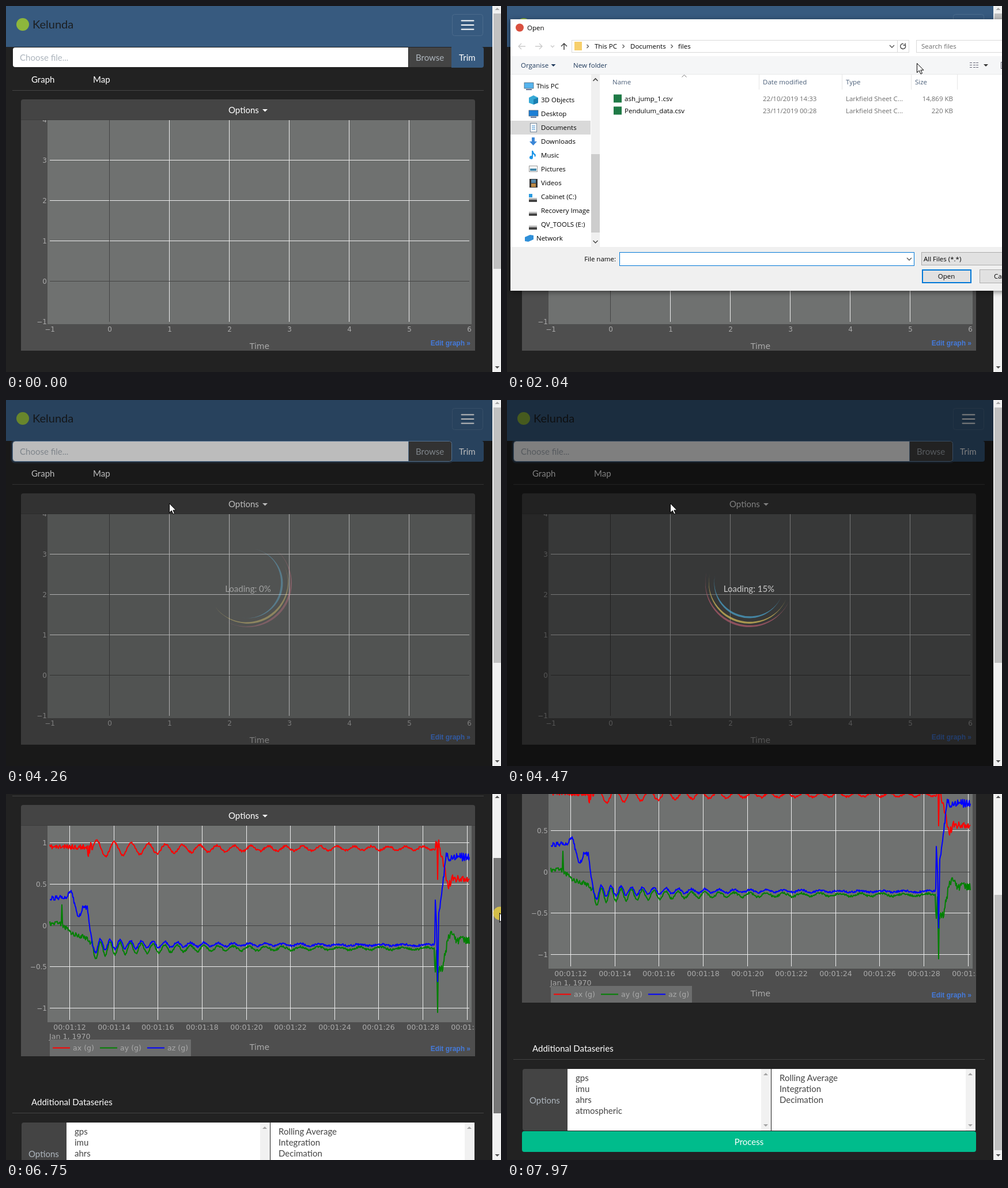
Write an HTML page that moves like this. It is 859x635 px and loops after 8000 ms.

```html
<!DOCTYPE html>
<html lang="en">
<head>
<meta charset="utf-8">
<title>Data viewer</title>
<style>
html, body { margin: 0; width: 100%; height: 100%; overflow: hidden; background: #222; }
svg { display: block; }
text { white-space: pre; }
.ui { font: 15px Lato, sans-serif; fill: #fff; }
.tick { font: 12px "DejaVu Sans", Verdana, sans-serif; fill: #aaa; }
.time { font-size: 12.6px; }
.axis { font-size: 14px; }
.win { font: 11.5px "Open Sans", "Noto Sans", sans-serif; fill: #000; }
.link { font: bold 12px "Liberation Sans", Arial, sans-serif; fill: #447adb; }
.mid { text-anchor: middle; }
.end { text-anchor: end; }
.blue { fill: #1e395b; }
.grey { fill: #6d6d6d; }
.pale { fill: #adb5bd; }
.dark { fill: #444; }
#dialog { filter: drop-shadow(0 2px 5px rgba(0,0,0,.5)); }
</style>
</head>
<body>
<svg id="stage" width="859" height="635" viewBox="0 0 859 635"></svg>
<script>
const LOOP = 8000, FIRST = 400, TICK = 203.3;  // the picture is refreshed once per tick
const OPEN = 2020, PICK = 3850, LOAD = 4050, READY = 5270, HOVER = 6080, PRESS = 6290, RELEASE = 7700;

const POINTER = [[400, 8, 232], [1010, 800, 115], [1420, 714, 96], [1620, 710, 98], [2230, 712, 100],
  [3040, 380, 200], [3450, 285, 170], [3650, 283, 179], [READY - 200, 283, 179], [5480, 838, 118], [HOVER, 856, 108]];
const SCROLL = [[PRESS, 0], [6700, 143], [7350, 228], [7900, 236]];

function along(keys, x) {
  if (x <= keys[0][0]) return keys[0].slice(1);
  const i = keys.findIndex(k => k[0] > x);
  if (i < 0) return keys.at(-1).slice(1);
  const a = keys[i - 1], b = keys[i], u = (x - a[0]) / (b[0] - a[0]);
  return a.slice(1).map((v, j) => v + (b[j + 1] - v) * u);
}

const rect = (x, y, w, h, fill, more = '') => `<rect x="${x}" y="${y}" width="${w}" height="${h}" fill="${fill}" ${more}/>`;
const text = (x, y, s, cls = 'ui', more = '') => `<text x="${x}" y="${y}" class="${cls}" ${more}>${s}</text>`;
const line = (d, color, w = 1) => `<path d="${d}" fill="none" stroke="${color}" stroke-width="${w}"/>`;
const fill = (d, color) => `<path d="${d}" fill="${color}"/>`;
const each = (items, f) => items.map(f).join('');
const range = (n, from = 0, step = 1) => [...Array(n).keys()].map(i => from + i * step);
const vert = (x, y1, y2, c = '#eee') => line(`M${x} ${y1}V${y2}`, c);
const horiz = (y, c = '#eee', x1 = 76, x2 = 804) => line(`M${x1} ${y}H${x2}`, c);
const down = (x, y, r, c) => fill(`M${x - r} ${y}h${2 * r}l${-r} ${r}z`, c);
const up = (x, y, r, c) => fill(`M${x - r} ${y}h${2 * r}l${-r} ${-r}z`, c);
const signed = v => String(v).replace('-', '−');

// A curve is a coarse base line, a damped swing while the sensor hangs free, and noise.
const FREE = 148, CAUGHT = 744;
const damped = (x, high, low) => low + high * Math.exp((160 - x) / 140);
const steady = x => damped(x, 11, 3) * Math.cos((x - 158) / 29.75 * 2 * Math.PI);
const slowing = x => Math.cos(Math.log(1 + .045 * (x - 164) / 16.2) / .045 * 2 * Math.PI);

function random(seed) {
  return () => (seed = seed * 16807 % 2147483647) / 2147483647;
}
function curve(color, seed, jolt, swing, base) {
  const rnd = random(seed);
  const pts = range(729, 76).map(x => {
    const free = x > FREE && x < CAUGHT;
    const shaken = Math.abs(x - 144) < 4 || Math.abs(x - 748) < 4;
    const noise = shaken ? jolt : free ? 1.8 : x < FREE ? 4 : 7;
    const y = along(base, x)[0] - (free ? swing(x) : 0) + (rnd() * 2 - 1) * noise;
    return x + ' ' + y.toFixed(1);
  });
  return `<path d="M${pts.join('L')}" fill="none" stroke="${color}" stroke-width="2" stroke-linejoin="round"/>`;
}
function curves() {
  return curve('red', 11, 16, steady,
      [[76, 235], [141, 235], [160, 238], [748, 237], [749, 293], [750, 225], [768, 304], [775, 290], [804, 293]])
    + curve('green', 29, 5, x => damped(x, 11, 2) * slowing(x),
      [[76, 368], [96, 368], [97, 332], [98, 370], [115, 385], [141, 393], [153, 418], [165, 411], [743, 411],
       [745, 456], [747, 415], [749, 517], [750, 450], [757, 446], [768, 390], [775, 381], [780, 397], [804, 397]])
    + curve('blue', 47, 5, x => damped(x, 9, 1) * slowing(x),
      [[76, 330], [80, 324], [104, 322], [113, 310], [126, 359], [134, 337], [141, 340], [150, 412], [160, 404],
       [744, 405], [745, 326], [747, 370], [749, 468], [751, 352], [764, 252], [804, 252]]);
}

function emptyPlot() {
  return rect(72, 198, 736, 354, '#6f7170')
    + each(range(5, 283.5, 104), x => vert(x, 198, 548))
    + each(range(3, 267.5, 70), y => horiz(y))
    + vert(179.5, 198, 548, '#444') + horiz(477.5, '#444')
    + each(range(6, -1), v => text(71, 482 - 70 * v, signed(v), 'tick end'))
    + each(range(8, -1), v => text(180 + 104 * v, 565, signed(v), 'tick mid'))
    + text(440, 595, 'Time', 'tick axis mid');
}
function dataPlot() {
  const second = s => Math.round(110 + 38.32 * (s - 12)) + .5;
  const level = v => Math.round(370.5 - 143.3 * v) + .5;
  return rect(72, 198, 736, 341, '#6f7170')
    + each(range(10, 12, 2), s => vert(second(s), 198, 535) + text(second(s), 552, '00:01:' + s, 'tick time mid'))
    + each(range(5, -1, .5), v => horiz(level(v), v ? '#eee' : '#444') + text(71, level(v) + 4.5, signed(v), 'tick end'))
    + text(75, 568, 'Jan 1, 1970', 'tick time')
    + curves()
    + rect(76, 569, 245, 29, '#6c6d6d')
    + each(['red', 'green', 'blue'], (c, i) => line(`M${81 + 82 * i} 583.5h30`, c, 2)
      + text(116 + 82 * i, 588, `a${'xyz'[i]} (g)`, 'tick time'))
    + text(440, 587, 'Time', 'tick axis mid');
}

function list(x, w, items) {
  return rect(x, 713, w, 107, '#fff') + rect(x + w - 17, 713, 17, 107, '#f1f1f1')
    + up(x + w - 9, 724, 4, '#a3a3a3') + down(x + w - 9, 809, 4, '#a3a3a3')
    + each(items, (s, i) => text(x + 14, 734 + 19 * i, s, 'ui dark'));
}
function page() {
  return rect(0, 0, 844, 71, '#375a7f')
    + '<circle cx="29" cy="32" r="11" fill="#8db63c"/>'
    + text(46, 39, 'Kelunda', 'ui', 'style="font-size:20px;fill:#1c1f22"')
    + rect(774.5, 14.5, 53, 37, 'none', 'rx="4" stroke="#4b6b8c"')
    + each(range(3, 25.5, 7.5), y => horiz(y, '#fff" stroke-linecap="round', 790.5, 811.5).replace('width="1"', 'width="1.9"'))
    + fill('M698 72H16a4 4 0 0 0-4 4v26a4 4 0 0 0 4 4H698z', '#fff')
    + rect(699, 72, 74, 34, '#444')
    + fill('M773 71h52a4 4 0 0 1 4 4v28a4 4 0 0 1-4 4h-52z', '#375a7f')
    + `<g id="focus">${rect(10, 70, 765, 38, 'none', 'rx="5" stroke="#375a7f" stroke-width="3" opacity=".4"')}
      ${rect(11.5, 71.5, 762, 35, 'none', 'rx="4" stroke="#739ac2"')}${vert(698.5, 72, 106, '#739ac2')}</g>`
    + text(24, 95, 'Choose file...', 'ui pale') + text(711, 95, 'Browse', 'ui pale')
    + text(786, 95, 'Trim') + text(44, 133, 'Graph') + text(151, 133, 'Map')
    + horiz(146.5, '#444', 11, 829)
    + rect(26, 198, 788, 400, '#4e4e4e')
    + `<g clip-path="url(#card)"><g id="empty">${emptyPlot()}</g><g id="data">${dataPlot()}</g></g>`
    + fill('M26 198V166a4 4 0 0 1 4-4H810a4 4 0 0 1 4 4V198z', '#444') + horiz(197.5, '#3c3c3c', 26, 814)
    + text(386, 186, 'Options') + down(449.5, 179, 4.5, '#fff')
    + text(806, 589, 'Edit graph »', 'link end')
    + text(44, 683, 'Additional Dataseries') + horiz(696.5, '#444', 11, 829)
    + rect(27, 713, 81, 107, '#444', 'rx="4"') + text(39, 773, 'Options', 'ui pale')
    + list(105, 353, ['gps', 'imu', 'ahrs', 'atmospheric'])
    + list(459, 354, ['Rolling Average', 'Integration', 'Decimation'])
    + rect(26, 821, 788, 36, '#00bc8c', 'rx="4"') + text(420, 845, 'Process', 'ui mid');
}

const ring = (r, c) => `<path class="ring" fill="${c}" d="M${-r} 0A${r} ${r} 0 0 0 ${r} 0A${r} ${r - 3.5} 0 0 1 ${-r} 0z"/>`;
function overlay() {
  return rect(0, 0, 844, 635, '#000', 'opacity=".5"')
    + `<g transform="translate(420 318)" opacity=".7">${ring(76, '#b25b6d')}${ring(70, '#d9c05a')}${ring(60.5, '#4aa5cf')}</g>`
    + text(420, 333, '', 'ui mid', 'id="percent" style="fill:#ccc"');
}

// Icons are drawn around the left centre of a 16 px box
const screen = c => rect(0, -6, 16, 10, c, 'stroke="#456" stroke-width=".7"') + rect(3, 5, 10, 2, '#679');
const drive = rect(0, 4, 14, 5, '#444') + rect(0, 2, 14, 3, '#bbb');
const PLACES = [
  ['This PC', screen('#56b4ee')],
  ['3D Objects', fill('M0-4l8-4 8 4v9l-8 3-8-3z', '#36a9d6') + fill('M8-1l8-3v9l-8 3z', '#1b7fb0')],
  ['Desktop', screen('#1c7fd6')],
  ['Documents', rect(2.5, -7.5, 11, 15, '#fff', 'stroke="#789"') + line('M5-3h6m-6 3h6m-6 3h6', '#38c')],
  ['Downloads', fill('M5-7h5v7h4l-6.500 7-6.500-7h4z', '#3a86d6')],
  ['Music', fill('M5-8h2q1 4 5 7 0 3-2 4 0-4-3-5v6a3 3 0 1 1-2-3z', '#1e96e8')],
  ['Pictures', rect(.5, -5.5, 14, 10, '#fff', 'stroke="#999"') + rect(2, -1, 11, 4, '#48a')],
  ['Videos', rect(1, -7, 14, 15, '#333') + rect(4, -6, 8, 6, '#58a') + rect(4, 1, 8, 6, '#b84')],
  ['Cabinet (C:)', drive + rect(0, -5, 6, 6, '#2a9be0')],
  ['Recovery Image', drive],
  ['QV_TOOLS (E:)', drive],
  ['Network', fill('M1-2l9-4 6 1v7l-9 4-6-1z', '#2f8fd8')]
];
function place([name, icon], i) {
  const root = i % 11 == 0;
  return `<g transform="translate(${root ? 30 : 38} ${Math.min(139 + 24 * i, 411 - (11 - i) * 24 + (i < 11 ? -8 : 0))})">`
    + icon + text(21, 4, name, 'win') + '</g>';
}
function fileRow(y, name, date, size) {
  return rect(185, y - 7, 14, 14, '#1f7a46') + text(204, y + 4, name, 'win')
    + text(444, y + 4, date, 'win grey') + text(588, y + 4, 'Larkfield Sheet C...', 'win grey')
    + text(774, y + 4, size + ' KB', 'win end grey');
}
function dialog() {
  const chevron = (x, y, s = 4, c = '#555') => line(`M${x - s} ${y - s / 2}l${s} ${s}l${s} ${-s}`, c, 1.4);
  const arrow = (x, s) => line(`M${x - 6 * s} 70h${12 * s}m${-5 * s} -5l${5 * s} 5l${-5 * s} 5`, '#ccc', 1.4);
  const box = (x, y, w, h, bg, edge, lw = 1) => rect(x, y, w, h, bg, `stroke="${edge}" stroke-width="${lw}"`);
  const column = (x, s) => text(x, 136, s, 'win', 'style="fill:#4c607a"');
  return rect(6, 23, 870, 471, '#fff')
    + '<circle cx="22" cy="37.5" r="7" fill="#d9503f"/>' + text(35, 42, 'Open', 'win')
    + arrow(26, -1) + arrow(55, 1) + chevron(79, 70, 3, '#ccc')
    + line('M99 76V65m-5 5l5-5l5 5', '#444', 1.5)
    + box(112.5, 59.5, 585, 21, '#fff', '#d9d9d9') + rect(117, 62, 13, 15, '#f7cf6b')
    + each([140, 202, 286], x => line(`M${x - 1.5} 67l3 3l-3 3`, '#555', 1.2))
    + text(152, 74, 'This PC', 'win') + text(214, 74, 'Documents', 'win') + text(297, 74, 'files', 'win')
    + chevron(668, 70) + vert(677.5, 60, 80, '#d9d9d9')
    + line('M691 67.5a4.5 4.5 0 1 1-3-2m3-1v3.5h-3.5', '#444', 1.4)
    + box(710.5, 59.5, 170, 21, '#fff', '#d9d9d9') + text(719, 74, 'Search files', 'win grey')
    + rect(6, 87, 870, 31, '#f5f6f7') + horiz(118.5, '#e8e9ea', 6, 859)
    + text(24, 107, 'Organise', 'win blue') + down(80.5, 101, 4, '#1e395b')
    + text(115, 107, 'New folder', 'win blue')
    + each(range(3, 98.5, 4), y => line(`M803 ${y}h4m2 0h4m1 0h4`, '#667'))
    + down(831, 101, 4, '#333') + box(857.5, 97.5, 12, 11, '#fff', '#667')
    + rect(6, 199, 139, 24, '#d9d9d9') + each(PLACES, place)
    + rect(146, 119, 15, 299, '#f0f0f0') + rect(146, 257, 15, 136, '#cdcdcd')
    + line('M149.5 130l4-4l4 4', '#444', 1.6) + chevron(153.5, 409, 4, '#444')
    + each([437.5, 581.5, 701.5, 781.5], x => vert(x, 119, 145, '#e5e5e5'))
    + column(183, 'Name') + column(444, 'Date modified') + column(588, 'Type') + column(708, 'Size')
    + line('M303.5 123.5l4-4l4 4', '#777')
    + rect(180, 150, 598, 21, '#e5f3ff', 'id="row"')
    + fileRow(160.5, 'ash_jump_1.csv', '22/10/2019 14:33', '14,869')
    + fileRow(181.5, 'Pendulum_data.csv', '23/11/2019 00:28', '220')
    + rect(6, 418, 870, 76, '#f0f0f0') + text(189, 443, 'File name:', 'win end')
    + box(195.5, 427.5, 511, 23, '#fff', '#0078d7') + chevron(698, 439)
    + text(199, 443, 'Pendulum_data.csv', 'win', 'id="picked"') + `<g id="caret">${vert(199.5, 431, 447, '#000')}</g>`
    + box(719.5, 427.5, 170, 22, '#e1e1e1', '#adadad') + text(723, 443, 'All Files (*.*)', 'win')
    + box(721, 458, 84, 22, '#e1e1e1', '#0078d7', 2) + text(762.5, 473, 'Open', 'win mid')
    + box(820.5, 457.5, 84, 23, '#e1e1e1', '#adadad') + text(845, 473, 'Cancel', 'win');
}

document.getElementById('stage').innerHTML = `
  <clipPath id="card"><rect x="26" y="198" width="788" height="400"/></clipPath>
  ${rect(0, 0, 859, 635, '#222')}
  <g id="page">${page()}</g>
  <g id="overlay">${overlay()}</g>
  ${rect(844, 0, 15, 635, '#f1f1f1')}${rect(846, 13, 13, 443, '#c1c1c1', 'id="thumb"')}
  <g id="arrows">${up(852.5, 7, 4, '#505050')}</g>${down(852.5, 625, 4, '#505050')}
  <g id="dialog">${dialog()}</g>
  <circle id="press" cx="857" r="11.5" fill="#d3be48"/>
  <g id="pointer"><circle id="busy" cx="14" cy=".5" r="5.5" fill="none" stroke="#2196e3" stroke-width="3"/>
    <path d="M.5.5V16.5l3.8-3.5 2.7 6 2.5-1.2-2.6-5.6h5z" fill="#fff" stroke="#000"/></g>`;

const el = id => document.getElementById(id);
const show = (id, on) => el(id).style.display = on ? '' : 'none';
const set = (id, name, value) => el(id).setAttribute(name, value);
const rings = document.querySelectorAll('.ring');

function draw(t) {
  const within = (a, b) => t >= a && t < b;
  const scroll = Math.round(along(SCROLL, t)[0]), thumb = Math.round(scroll * .687);
  const [x, pathY] = along(POINTER, t), y = Math.round(pathY) + thumb;

  set('page', 'transform', `translate(0 ${-scroll})`);
  show('empty', t < READY);
  show('data', t >= READY);
  show('focus', t >= OPEN);

  set('thumb', 'y', 13 + thumb);
  set('thumb', 'fill', within(PRESS, RELEASE) ? '#787878' : within(HOVER, PRESS) ? '#a8a8a8' : '#c1c1c1');
  set('arrows', 'opacity', scroll ? 1 : .45);

  const age = t - LOAD;
  show('overlay', within(LOAD, READY));
  set('overlay', 'opacity', Math.min(1, .5 + age / 400));
  el('percent').textContent = `Loading: ${Math.max(0, Math.round(age * .12 - 35))}%`;
  [2000, 3000, 1500].forEach((period, i) =>
    rings[i].setAttribute('transform', `rotate(${18 + (age - 416) * 360 / period})`));

  show('dialog', within(OPEN, LOAD));
  show('row', y >= 150 && y < 192);
  set('row', 'y', y < 171 ? 150 : 171);
  set('row', 'fill', t < PICK ? '#e5f3ff' : '#cce8ff');
  show('picked', t >= PICK);
  show('caret', t < PICK && t % 1060 < 530);

  show('pointer', within(FIRST, RELEASE));
  set('pointer', 'transform', `translate(${Math.round(x)} ${y})`);
  show('busy', within(1600, OPEN));
  show('press', within(PRESS, RELEASE));
  set('press', 'cy', y + 1);
}

const start = performance.now();
function frame() {
  const t = Math.max(0, performance.now() - start) % LOOP;
  draw(t < FIRST ? 0 : FIRST + Math.floor((t - FIRST) / TICK) * TICK);
  requestAnimationFrame(frame);
}
frame();
</script>
</body>
</html>
```
